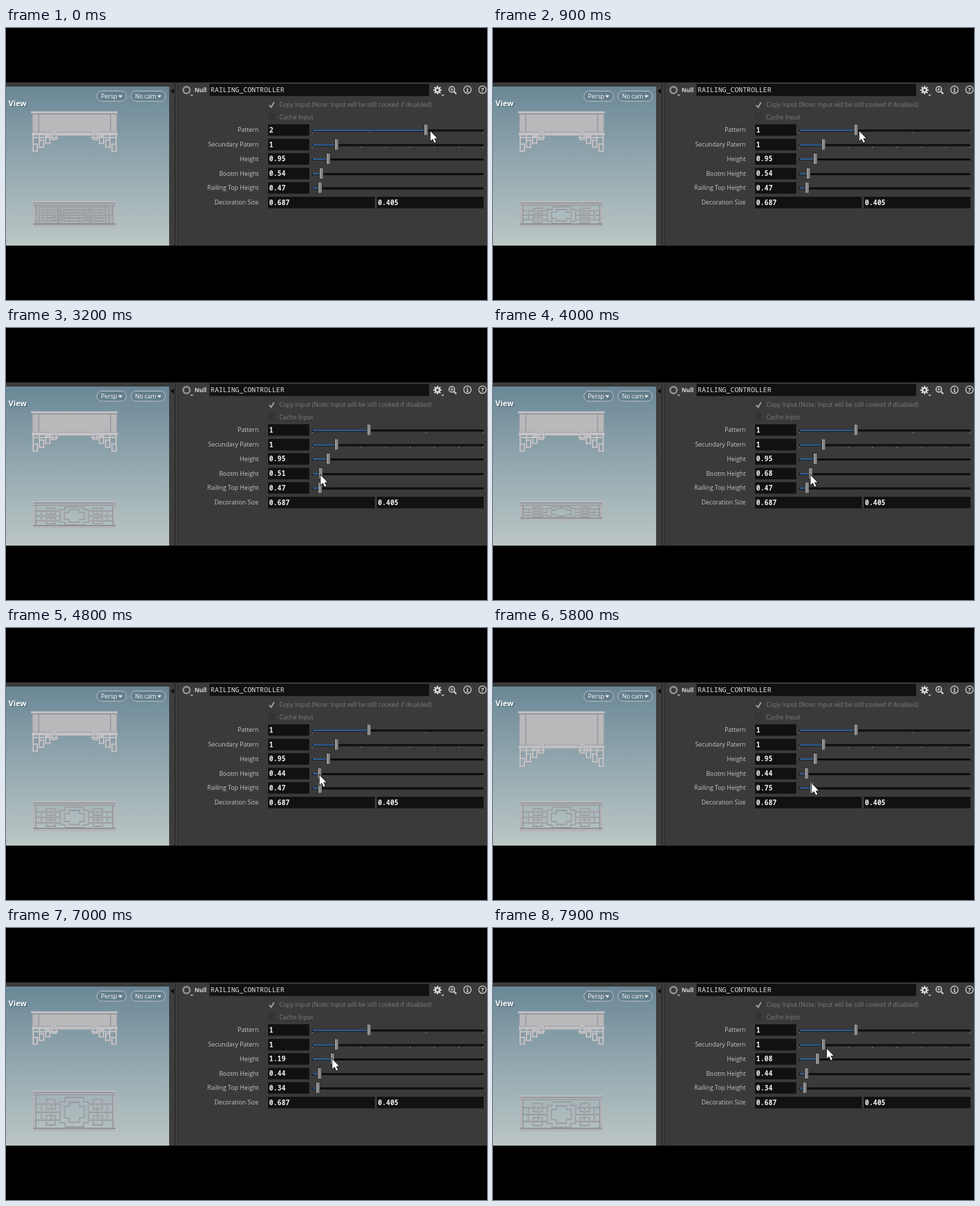
Animation of 690x390 px, one loop 8000 ms. Source, as an HTML page with a canvas:

```html
<!DOCTYPE html>
<html lang="en">
<head>
<meta charset="utf-8">
<title>Railing controller</title>
<style>
html, body { margin: 0; width: 100%; height: 100%; overflow: hidden; background: #000; }
canvas { display: block; }
</style>
</head>
<body>
<canvas id="stage" width="690" height="390"></canvas>
<script>
const ctx = document.getElementById('stage').getContext('2d');
const LOOP = 8000, UNIT = 62.5;
const SANS = '"Open Sans", "Noto Sans", sans-serif';
const MONO = '"Noto Sans Mono", "DejaVu Sans Mono", monospace';

// y: row centre, grab: height of the pointer while dragging, whole: snaps to integers
const params = {
  pattern: { label: 'Pattern', y: 146, grab: 148, max: 3, start: 2.08, whole: true },
  second: { label: 'Secundary Patern', y: 167, grab: 173, max: 7, start: 1.14, whole: true },
  height: { label: 'Height', y: 187.5, grab: 188, max: 10, start: .95 },
  bottom: { label: 'Bootm Height', y: 208.5, grab: 211, max: 10, start: .54 },
  top: { label: 'Railing Top Height', y: 229, grab: 223, max: 10, start: .47 }
};

const drags = [
  ['pattern', 200, 900, 1.06], ['pattern', 1700, 2200, .91],
  ['bottom', 2800, 3100, .54], ['bottom', 3100, 3300, .47],
  ['bottom', 3600, 4200, .78], ['bottom', 4200, 4800, .44],
  ['top', 5100, 5800, .75], ['top', 5800, 6100, .34],
  ['height', 6500, 7000, 1.19], ['height', 7100, 7200, 1.23],
  ['height', 7300, 7600, 1.08], ['height', 7600, 7700, 1.08],
  ['second', 7900, 8000, 1.14]
].map(([name, from, to, value]) => ({ name, from, to, value }));

const mix = (a, b, p) => a + (b - a) * p;
const clamp = p => Math.max(0, Math.min(1, p));
const sliderX = (name, v) => 439 + 245 * v / params[name].max;

function rawValue(name, t) {
  return drags.filter(d => d.name === name)
    .reduce((v, d) => mix(v, d.value, clamp((t - d.from) / (d.to - d.from))), params[name].start);
}

function value(name, t) {
  const v = rawValue(name, t);
  return params[name].whole ? Math.round(v) : v;
}

function pointer(t) {
  const at = d => [sliderX(d.name, rawValue(d.name, t)), params[d.name].grab];
  const i = Math.max(0, drags.filter(d => d.from <= t).length - 1);
  const cur = drags[i], next = drags[i + 1];
  if (!next || t <= cur.to) return at(cur);
  const p = (t - cur.to) / (next.from - cur.to), goal = at(next);
  return at(cur).map((v, k) => mix(v, goal[k], p));
}

function rect(x, y, w, h, fill) {
  ctx.fillStyle = fill;
  ctx.fillRect(x, y, w, h);
}

function text(s, x, y, fill, size = 8.8, weight = 400, family = SANS, align = 'left') {
  ctx.font = `${weight} ${size}px ${family}`;
  ctx.textAlign = align;
  ctx.fillStyle = fill;
  ctx.fillText(s, x, y);
}

function line(d, color, width = 1) {
  ctx.strokeStyle = color;
  ctx.lineWidth = width;
  ctx.stroke(new Path2D(d));
}

function carved(d, light, dark, width) {
  ctx.save();
  ctx.translate(.7, .8);
  line(d, dark, width);
  ctx.restore();
  line(d, light, width);
}

function shape(d, fill) {
  ctx.fillStyle = fill;
  ctx.fill(new Path2D(d));
}

function ring(x, y, r, color, width) {
  ctx.strokeStyle = color;
  ctx.lineWidth = width;
  ctx.beginPath();
  ctx.arc(x, y, r, 0, 7);
  ctx.stroke();
}

// Draws once as given and once flipped around x = axis
function mirrored(axis, draw) {
  draw();
  ctx.save();
  ctx.translate(2 * axis, 0);
  ctx.scale(-1, 1);
  draw();
  ctx.restore();
}

function pill(x, w, label, size) {
  ctx.beginPath();
  ctx.roundRect(x + .5, 90.5, w, 14.5, 7);
  ctx.fillStyle = 'rgba(80,100,110,.3)';
  ctx.fill();
  ctx.strokeStyle = '#b9c3c8';
  ctx.lineWidth = 1;
  ctx.stroke();
  text(label, x + 6, 101, '#f2f5f6', size);
  shape(`M${x + w - 11} 96.5h6l-3 3.5z`, '#f2f5f6');
}

function drawTable(r) {
  const y = 121 + 66 * r, drop = 20 + 12 * r;
  rect(38, 121, 121, y - 121, '#b9b8ba');
  rect(36, 119.5, 124, 3, '#c5c3c6');
  rect(37, 122.5, 122, 1.3, '#84898e');
  rect(37, y - 2, 123, 2, '#c8c6c9');
  rect(38, y - 3, 121, 1, '#9b9da1');
  let d = '';
  for (let i = 0; i < 4; i++) {
    d += `M${39 + 9 * i} ${y}v${drop * (1 - .22 * i) - 1}h6v${-.4 * drop}h-6M${39 + 9 * i} ${y + 5}h9`;
  }
  mirrored(98.5, () => {
    rect(37.5, 124, .8, y - 127, '#9a9ca0');
    rect(46.5, 124, 1, y - 127, '#85898d');
    carved(d, '#c3c1c4', '#929a9e', 2);
  });
  rect(37, y, 123, 2, '#c3c1c4');
  rect(74, y + 2, 49, 1, '#a0a6a9');
}

// Line work of the panel; Y maps a share of its height to the stage
function fretwork(pattern, Y) {
  const box = (x0, a, x1, b) => `M${x0} ${Y(a)}H${x1}V${Y(b)}H${x0}Z`;
  let d = '';
  if (pattern === 1) {
    for (const k of [0, 1]) {
      const x = 77 + 6 * k, a = .06 + .14 * k;
      d += `M98 ${Y(a)}H${x + 7}V${Y(a + .13)}H${x}V${Y(.87 - a)}H${x + 7}V${Y(1 - a)}H98`;
      d += box(57, .12 + .48 * k, 70, .4 + .48 * k);
      d += `M42 ${Y(.26 + .48 * k)}H50M64 ${Y(.26 + .48 * k)}H77`;
    }
    return d + box(50, .26, 64, .74) + `M42 ${Y(.5)}H77`;
  }
  for (let i = 0; i < 3; i++) {
    d += box(47 + 5 * i, .06 + .15 * i, 73 - 3 * i, .94 - .15 * i);
    d += box(76 + 4 * i, .06 + .15 * i, 120 - 4 * i, .94 - .15 * i);
  }
  return d + `M42 ${Y(.5)}H98M90 ${Y(.06)}V${Y(.94)}`;
}

function drawRailing(h, b, pattern) {
  const top = 307.4 - UNIT * h, end = 319 - UNIT * b;
  const y0 = top + 6, y1 = end - 4;
  const d = fretwork(pattern, p => mix(y0, y1, p));
  if (pattern === 2) rect(44, y0, 108, y1 - y0, 'rgba(165,166,170,.55)');
  mirrored(98, () => {
    carved(d, '#adabaf', '#858b90', 1.3);
    rect(39, top, 3.5, end - top, '#b5b3b7');
    rect(42.5, y0, 1, y1 - y0, '#82888d');
  });
  rect(38, top, 120, 2.3, '#bdbbbe');
  rect(39, top + 2.3, 118, 1.3, '#7f868b');
  rect(39, top + 3.6, 118, 2.2, '#b1afb3');
  rect(39, top + 5.8, 118, .8, '#858b90');
  rect(39, end - 5, 118, 1.8, '#858b90');
  rect(39, end - 3.2, 118, 3.2, '#b5b3b7');
}

function drawView(s) {
  const g = ctx.createLinearGradient(0, 84, 0, 312);
  g.addColorStop(0, '#6a8797');
  g.addColorStop(.5, '#94a9b0');
  g.addColorStop(1, '#bcc6c5');
  rect(0, 84, 234, 228, g);
  text('View', 4.5, 113, 'rgba(30,50,60,.6)', 11, 700);
  text('View', 3.5, 112, '#fff', 11, 700);
  pill(130, 42, 'Persp', 8.85);
  pill(179, 49, 'No cam', 8.5);
  drawTable(s.top);
  drawRailing(s.height, s.bottom, s.pattern);
}

function field(x, y, w, label) {
  rect(x, y - 8, w, 16.5, '#111');
  text(label, x + 1.5, y + 3.5, '#f0f0f0', 9.8, 700, MONO);
}

function slider(x, y, steps) {
  rect(439, y - .5, 246, 3, '#0d0d0d');
  rect(440, y - .5, x - 440, 2.3, '#315f93');
  for (let i = 0; i <= steps; i++) rect(439 + 245 * i / steps, y + 3, 1, 2, '#777');
  rect(x - 3, y - 8, 6, 16, '#252525');
  rect(x - 2, y - 7.5, 4.5, 15, '#858585');
  rect(x - 2, y - 7.5, 1.2, 15, '#a8a8a8');
}

function rowLabel(label, y) {
  text(label, 362.5, y + 3.3, '#c3c3c3', 8.8, 400, SANS, 'right');
}

function drawHeader() {
  ring(259, 89, 4.8, '#949494', 2.4);
  shape('M264 95.5h5l-2.5 2.5z', '#aaa');
  text('Null', 270.5, 92, '#d8d8d8', 8.4, 700);
  rect(292, 80, 315, 17.5, '#111');
  text('RAILING_CONTROLLER', 293.5, 92.3, '#e4e4e4', 9.8, 500, MONO);
  for (let i = 0; i < 8; i++) {
    const c = Math.cos(i * Math.PI / 4), n = Math.sin(i * Math.PI / 4);
    line(`M${619 + 3 * c} ${89 + 3 * n}L${619 + 6 * c} ${89 + 6 * n}`, '#d6d6d6', 2);
  }
  ring(619, 89, 3, '#d6d6d6', 2.4);
  shape('M624 95.5h5l-2.5 2.5z', '#bbb');
  ring(639.5, 88, 4, '#d0d0d0', 1.5);
  line('M637.5 88h4M639.5 86v4', '#d0d0d0');
  line('M642.5 91L646 94.5', '#d0d0d0', 2.2);
  ring(662, 88.5, 5.3, '#d0d0d0', 1.2);
  text('i', 662, 91.5, '#e4e4e4', 8.5, 700, '"Noto Serif", serif', 'center');
  ring(683.5, 88.5, 5.3, '#d0d0d0', 1.2);
  text('?', 683.5, 91.8, '#e4e4e4', 8.8, 700, SANS, 'center');
}

function drawPanel(s) {
  rect(234, 84, 13, 228, '#3d3d3d');
  shape('M241 87v7l-5-3.5z', '#0c0c0c');
  rect(242, 79, 1, 233, '#222');
  rect(246, 79, 1, 233, '#2a2a2a');
  drawHeader();
  rect(376, 105, 10, 10, '#373737');
  line('M377.5 110.5L380.5 113.5L384.5 106.5', '#9b9b9b', 2);
  text('Copy Input (Note: Input will be still cooked if disabled)', 392, 113.3, '#7d7d7d', 8.77);
  rect(376, 122, 10, 10, '#343434');
  text('Cache Input', 392, 130.6, '#7d7d7d', 8.77);
  for (const [name, p] of Object.entries(params)) {
    rowLabel(p.label, p.y);
    field(376, p.y, 59, s[name].toFixed(p.whole ? 0 : 2));
    slider(sliderX(name, s[name]), p.y, p.whole ? p.max : 0);
  }
  rowLabel('Decoration Size', 250);
  field(376, 250, 153, '0.687');
  field(532, 250, 153, '0.405');
}

function drawCursor(x, y) {
  ctx.save();
  ctx.translate(x, y);
  const arrow = 'M0 0V14L3.2 11L5.8 16.6L8 15.5L5.5 10.2H9.8Z';
  line(arrow, '#111', 1.6);
  shape(arrow, '#fff');
  ctx.restore();
}

function draw(now) {
  const t = Math.floor(now % LOOP / 100) * 100;
  const state = {};
  for (const name in params) state[name] = value(name, t);
  rect(0, 0, 690, 390, '#000');
  rect(0, 78, 690, 234, '#3a3a3a');
  drawView(state);
  drawPanel(state);
  drawCursor(...pointer(t));
}

const start = performance.now();
function loop() {
  draw(performance.now() - start);
  requestAnimationFrame(loop);
}
loop();
</script>
</body>
</html>
```
